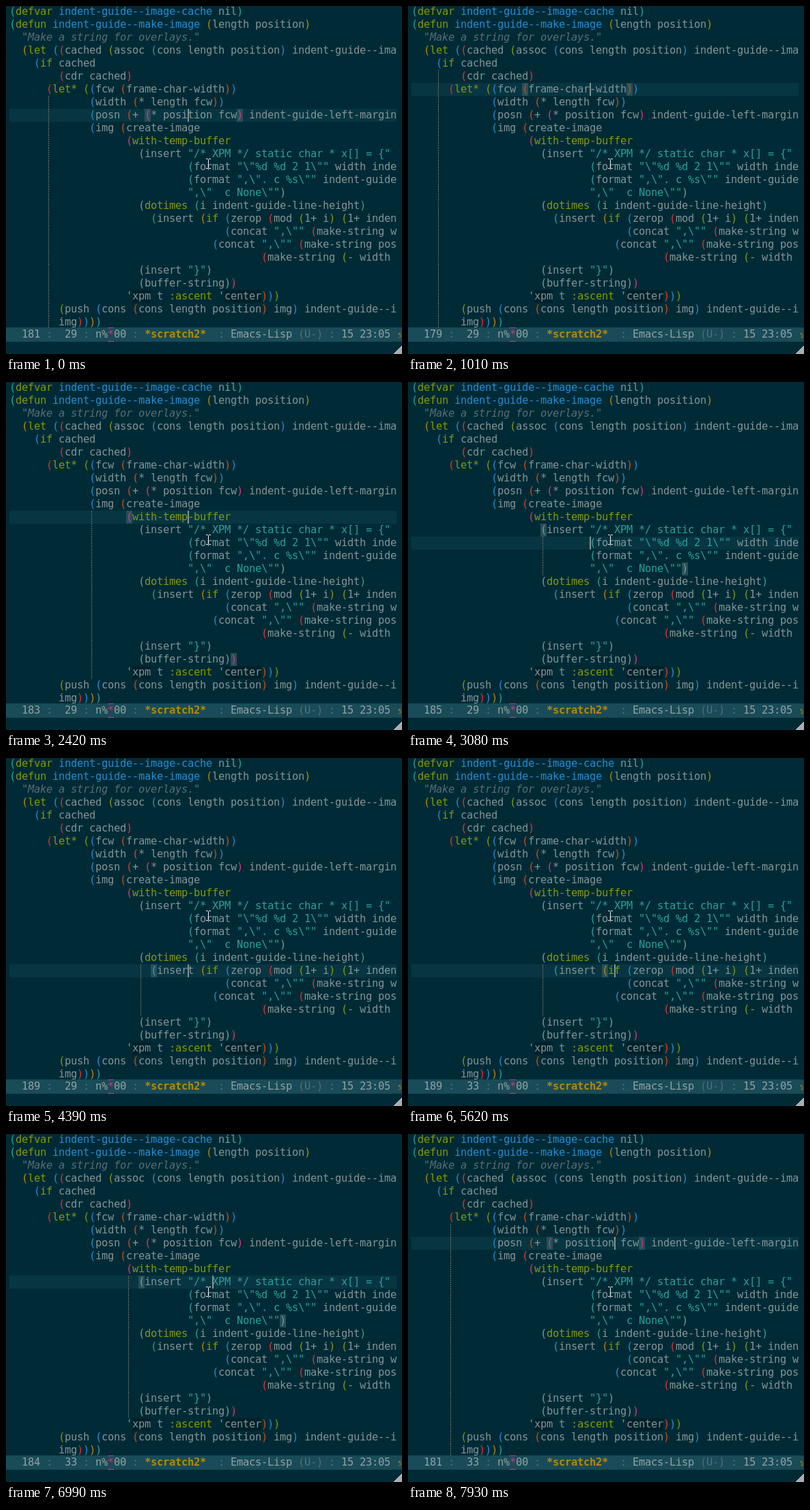
Write an HTML page that moves like this. It is 580 by 511 pixels and loops after 8000 ms.

```html
<!DOCTYPE html>
<html lang="en">
<head>
<meta charset="utf-8">
<title>Indent guide in an editor</title>
<style>
html, body { margin: 0; width: 100%; height: 100%; overflow: hidden; background: #002b36; }
svg { display: block; }
text { font: 15.4px "DejaVu Sans Mono", monospace; fill: #839496; white-space: pre; }
</style>
</head>
<body>
<svg id="stage" width="580" height="511" viewBox="0 0 580 511"></svg>
<script>
const CELL = 9, ROW = 19, LEFT = 5, RIGHT = 572, FIRST_LINE = 173, LOOP = 8000;
const C = {
  text: '#839496', dim: '#586e75', keyword: '#859900', name: '#268bd2', string: '#2aa198',
  gold: '#b58900', pink: '#d33682', line: '#073642', match: '#264f5a', quoted: '#00212a', bar: '#194b58'
};
// Bracket colours by nesting depth, repeating after nine levels
const RAINBOW = [C.string, C.gold, C.name, '#dc322f', C.keyword, C.name, '#cb4b16', C.pink, C.text];

const code = String.raw`(defvar indent-guide--image-cache nil)
(defun indent-guide--make-image (length position)
  "Make a string for overlays."
  (let ((cached (assoc (cons length position) indent-guide--ima
    (if cached
        (cdr cached)
      (let* ((fcw (frame-char-width))
             (width (* length fcw))
             (posn (+ (* position fcw) indent-guide-left-margin
             (img (create-image
                   (with-temp-buffer
                     (insert "/* XPM */ static char * x[] = {"
                             (format "\"%d %d 2 1\"" width inde
                             (format ",\". c %s\"" indent-guide
                             ",\"  c None\"")
                     (dotimes (i indent-guide-line-height)
                       (insert (if (zerop (mod (1+ i) (1+ inden
                                   (concat ",\"" (make-string w
                                 (concat ",\"" (make-string pos
                                         (make-string (- width
                     (insert "}")
                     (buffer-string))
                   'xpm t :ascent 'center)))
        (push (cons (cons length position) img) indent-guide--i
        img))))`.split('\n');
// Nesting depth at the start of each row, in hex; long rows are cut off at the window edge
const startDepth = [...'00112335557899989bbc88744'].map(d => parseInt(d, 16));
const indent = code.map(s => s.search(/\S/));
const KEYWORDS = /^(defvar|defun|let\*?|if|with-temp-buffer|dotimes|:ascent)$/;

// Time and row of each cursor move
const moves = [
  [0, 8], [550, 7], [1010, 6], [1320, 7], [1680, 8], [2090, 9], [2420, 10], [2760, 11],
  [3080, 12], [3410, 13], [3780, 14], [4080, 15], [4390, 16], [4730, 17], [5060, 18],
  [5400, 17], [5620, 16], [5970, 15], [6390, 14], [6490, 13], [6740, 12], [6990, 11],
  [7330, 10], [7600, 9], [7930, 8]
];
const COLUMN_SHIFT = 5400;

const stage = document.getElementById('stage');
const colX = col => LEFT + col * CELL;
const rowY = row => row * ROW - 1;

function add(tag, attrs, content = '') {
  const el = document.createElementNS('http://www.w3.org/2000/svg', tag);
  set(el, attrs);
  el.textContent = content;
  return stage.appendChild(el);
}
function set(el, attrs) {
  for (const k in attrs) el.setAttribute(k, attrs[k]);
}
const rect = (x, y, width, height, fill) => add('rect', { x, y, width, height, fill });
// One character per grid cell
const cells = (col, s) => Array.from(s, (_, i) => colX(col + i)).join(' ');
const write = (col, y, s, fill, style = '') => add('text', { x: cells(col, s), y, style: `fill:${fill};${style}` }, s);

rect(0, 0, 580, 511, '#002b36');
const current = rect(LEFT, 0, RIGHT - LEFT, ROW, C.line);
rect(colX(20), rowY(22), 3 * CELL, ROW, C.quoted);
rect(colX(35), rowY(22), 6 * CELL, ROW, C.quoted);
const marks = [0, 1].map(() => rect(0, 0, CELL, ROW, C.match));

const brackets = [];
function drawRow(line, row) {
  const y = rowY(row) + 14;
  let depth = startDepth[row];
  for (const { 0: token, index } of line.matchAll(/"(?:\\.|[^"\\])*"|[()]|[^\s()"]+/g)) {
    if (token === '(' || token === ')') {
      const open = token === '(';
      if (open) depth++;
      brackets.push({ row, col: index, depth, open });
      write(index, y, token, RAINBOW[(depth - 1) % 9]);
      if (!open) depth--;
      continue;
    }
    const isDoc = row === 2, isString = token[0] === '"';
    const fill = isDoc ? C.dim : isString ? C.string : KEYWORDS.test(token) ? C.keyword
      : row < 2 && token.startsWith('indent-guide') ? C.name : C.text;
    write(index, y, token, fill, isDoc ? 'font-style:italic' : '');
  }
}
code.forEach(drawRow);

// Dashes restart on every text row
const guide = add('path', { stroke: '#696d6b', 'stroke-dasharray': '2 1 '.repeat(6) + '1 0', fill: 'none' });
const caret = rect(0, 0, 2, ROW, C.text);

// Mode line
rect(0, 472, 580, 21, C.bar);
const status = (col, s, fill = '#93a1a1', style) => write(col, 487, s, fill, style);
const lineNo = status(2, '000'), colNo = status(9, '00');
[6, 12, 20, 34, 52].forEach(col => status(col, ':', C.dim));
status(14, 'n%');
status(16, '*', C.pink);
rect(colX(16), 472, CELL, 1, C.pink);
rect(colX(16), 492, CELL, 1, C.pink);
status(17, '00');
status(22, '*scratch2*', C.gold, 'font-weight:bold');
status(36, 'Emacs-Lisp');
status(47, '(U-)', C.dim);
status(54, '15');
status(57, '23:05');
add('text', { x: 574, y: 487, style: `font-size:9px;fill:${C.gold}` }, '5');

// Resize grip and mouse pointer
add('path', { d: 'M580 499V511H568Z', fill: '#a9adad' });
add('path', { d: 'M568 511L580 499', stroke: '#d4d6d6' });
add('path', { d: 'M293 224.5h2.5l1 1 1-1h2.5M296.5 225.5v12M293 238.5h2.5l1-1 1 1h2.5', stroke: '#f0f0f0', fill: 'none' });

function enclosing(row, col) {
  const before = brackets.filter(b => b.row < row || (b.row === row && b.col < col));
  const last = before[before.length - 1];
  const depth = last.row === row ? last.depth - (last.open ? 0 : 1) : startDepth[row];
  const open = before.reverse().find(b => b.open && b.depth === depth);
  const end = brackets.slice(before.length).find(b => b.depth <= depth);
  return [open, end && !end.open && end.depth === depth ? end : null];
}

function guideSpan(row) {
  let top = row - 1, bottom = row;
  while (indent[top] >= indent[row]) top--;
  while (bottom + 1 < code.length && indent[bottom + 1] > indent[top]) bottom++;
  return { col: indent[top], y1: rowY(top + 1), y2: Math.min(rowY(bottom + 1), 472) };
}

let shown = '';
function draw(t) {
  const row = moves.filter(m => m[0] <= t).pop()[1];
  const col = Math.min(t < COLUMN_SHIFT ? 29 : 33, code[row].length);
  const key = row + ',' + col;
  if (key === shown) return;
  shown = key;

  set(current, { y: rowY(row) });
  set(caret, { x: colX(col), y: rowY(row) });
  enclosing(row, col).forEach((b, i) =>
    set(marks[i], b ? { x: colX(b.col), y: rowY(b.row), visibility: 'visible' } : { visibility: 'hidden' }));
  const g = guideSpan(row);
  set(guide, { d: `M${colX(g.col) + 3.5} ${g.y1}V${g.y2}` });
  lineNo.textContent = FIRST_LINE + row;
  colNo.textContent = col;
}

const start = performance.now();
function tick() {
  draw((performance.now() - start) % LOOP);
  requestAnimationFrame(tick);
}
tick();
</script>
</body>
</html>
```
